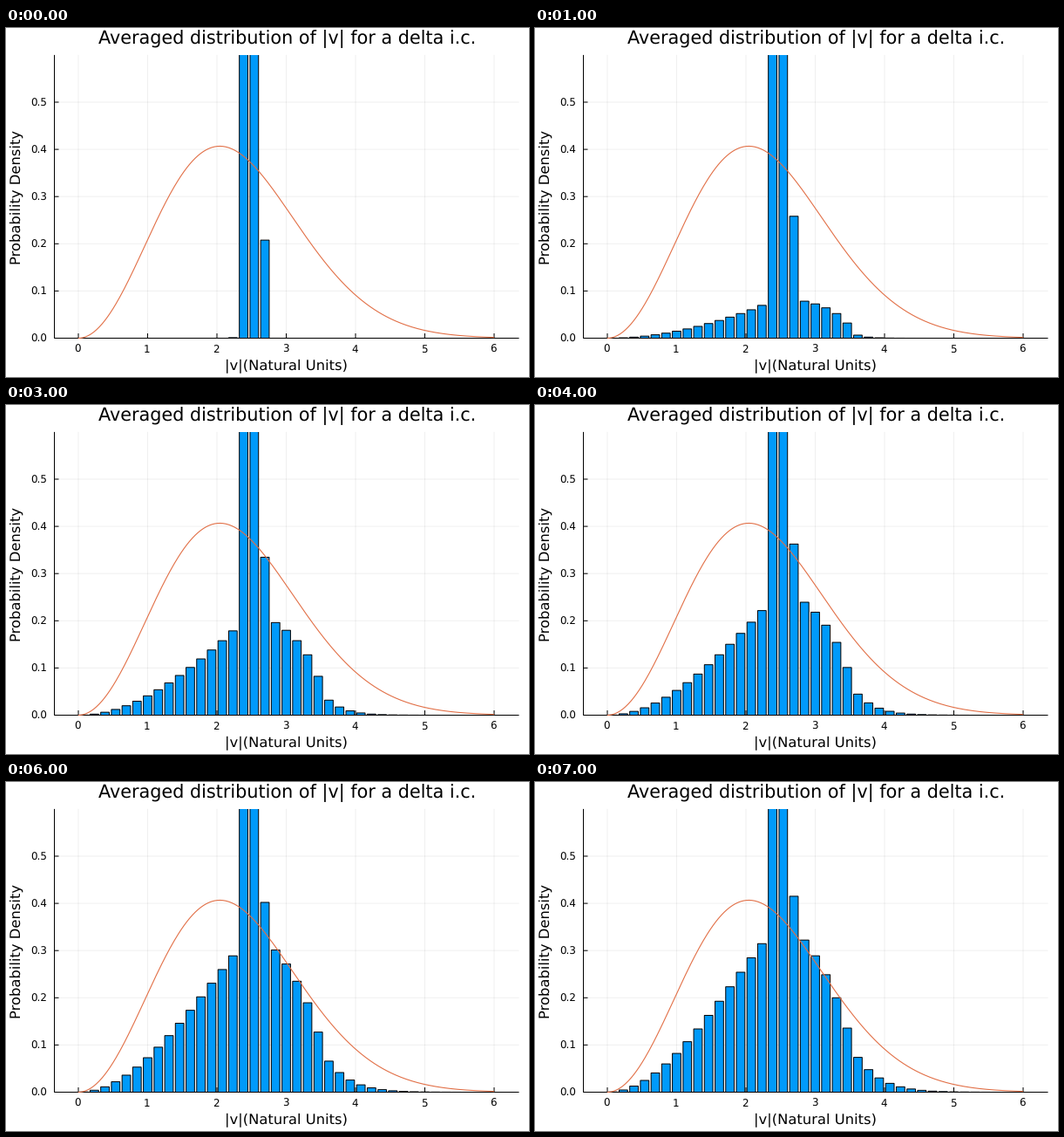
Recreate the animation shown at these times as a matplotlib script. Size 600 by 400 pixels, loop 8000 ms.

```python
import numpy as np
import matplotlib.pyplot as plt
from matplotlib.animation import FuncAnimation
from matplotlib.patches import Rectangle

W, H, DPI = 600, 400, 100
X0, Y0 = 83, 355.5           # pixel position of the data origin
SX, SY = 79.5, 541           # pixels per data unit
LEFT, RIGHT, TOP = (55.5 - X0) / SX, (588.5 - X0) / SX, 0.6
PX = 72 / DPI                # one pixel in points

BINS = 39
STEP = 6 / BINS
SPEED = 2.5                  # common initial speed
SIGMA = SPEED / np.sqrt(3)   # thermal width at the same energy

plt.rcParams.update({
    "font.family": "DejaVu Sans",
    "text.hinting": "no_hinting",
})

centers = (np.arange(BINS) + 0.5) * STEP


def normal(v, mean, width):
    return np.exp(-((v - mean) / width) ** 2 / 2) / (width * np.sqrt(2 * np.pi))


def densities(t):
    """Decaying initial spike plus the growing share of collided particles."""
    spike = normal(centers, 2.515, 0.0687) * np.exp(-0.165 * t)

    # One collision reaches speed * sqrt(2); later ones add a soft tail.
    spare = 2 * SPEED**2 - centers**2
    reach = 0.01 + 0.53 * np.sqrt(t)
    room = np.maximum(spare, 0) + 0.065 * t * np.exp(np.minimum(spare, 0) / reach)
    shape = centers * np.minimum(centers, np.sqrt(room))

    amount = 0.0156 * t / (1 + 0.035 * t)
    damping = np.exp(-(0.01 + 0.008 * t) * centers**2)
    return spike + amount * damping * shape


fig = plt.figure(figsize=(W / DPI, H / DPI), dpi=DPI, facecolor="white")
ax = fig.add_axes([0, 0, 1, 1])
ax.set_xlim(-X0 / SX, (W - X0) / SX)
ax.set_ylim((Y0 - H) / SY, Y0 / SY)
ax.axis("off")


def line(xs, ys, color="black", width=1.0, **kw):
    ax.plot(xs, ys, color=color, lw=width * PX, snap=False,
            solid_capstyle="butt", **kw)


def label(px, py, text, size, ha="center", **kw):
    """Text with its baseline anchored at a pixel position."""
    ax.text((px - X0) / SX, (Y0 - py) / SY, text, fontsize=size * PX,
            ha=ha, va="baseline", **kw)


for v in range(7):
    line([v, v], [0, TOP], alpha=0.06, zorder=1)
    line([v, v], [0, 5.5 / SY], zorder=2)
    label(X0 + SX * v - 0.7, 372, str(v), 11.9)
for p in np.arange(6) / 10:
    line([LEFT, RIGHT], [p, p], alpha=0.06, zorder=1)
    line([LEFT, LEFT + 5 / SX], [p, p], zorder=2)
    label(46.8, Y0 - SY * p + 4.5, f"{p:.1f}", 11.9, ha="right")

line([LEFT, RIGHT], [0, 0], zorder=2)
line([LEFT, LEFT], [0, TOP], zorder=2)

label(322.2, 18.3, "Averaged distribution of |v| for a delta i.c.", 20.8)
label(321.2, 392, "|v|(Natural Units)", 16.4)
label(16.2, 193.5, "Probability Density", 16.4, rotation=90,
      rotation_mode="anchor")

view = Rectangle((LEFT, -0.01), RIGHT - LEFT, TOP + 0.01,
                 transform=ax.transData)
bars = ax.bar(centers, densities(0), width=0.8 * STEP, color="#009afa",
              edgecolor="black", linewidth=PX, zorder=3)
for bar in bars:
    bar.set_snap(False)
    bar.set_clip_path(view)

v = np.linspace(0, 6, 300)
maxwell = np.sqrt(2 / np.pi) * v**2 / SIGMA**3 * np.exp(-v**2 / (2 * SIGMA**2))
line(v, maxwell, color="#e26f46", width=1.1, zorder=4)


def update(t):
    for bar, height in zip(bars, densities(t)):
        bar.set_height(height)
    return bars.patches


anim = FuncAnimation(fig, update, frames=8, interval=1000, repeat=True,
                     repeat_delay=0, blit=False)
plt.show()
```
